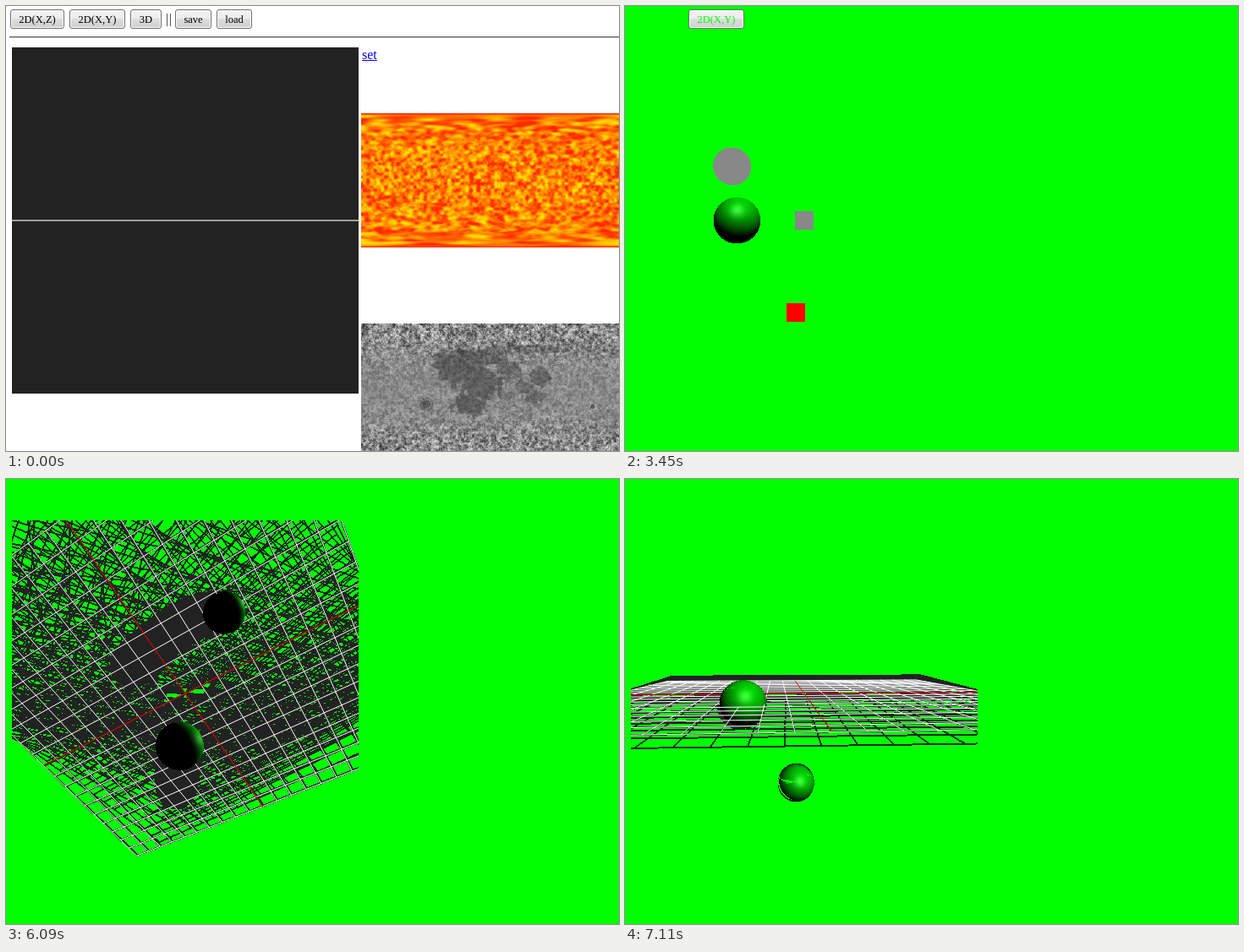
Animation, 725 px wide and 527 px high, one loop 8000 ms. Source, as an HTML page with a canvas:

```html
<!DOCTYPE html>
<html lang="en">
<head>
<meta charset="utf-8">
<title>Scene editor</title>
<style>
  html, body { margin: 0; width: 725px; height: 527px; overflow: hidden; background: #fff; }
  body { position: relative; font-family: "Liberation Serif", "Times New Roman", serif; }
  body.keyed { background: #0f0; }
  body.keyed .page { display: none; }
  body.keyed button { color: #0f0; }
  button, canvas, .page, hr, a { position: absolute; }
  button {
    top: 4px; height: 23px; box-sizing: border-box; margin: 0; padding: 1px 0 0;
    border: 1px solid #707070; border-radius: 3px; box-shadow: inset 0 0 0 1px #fbfbfb;
    font: 12.5px/19px "Liberation Serif", "Times New Roman", serif; color: #000; text-align: center;
    background: linear-gradient(#f3f3f3, #ebebeb 50%, #dddddd 50%, #cfcfcf);
  }
  .hover { border-color: #3c7fb1; background: linear-gradient(#eaf6fd, #d9f0fc 50%, #bee6fd 50%, #a7d9f5); }
  .press { border-color: #2c628b; background: linear-gradient(#e5f4fc, #c4e5f6 50%, #98d1ef 50%, #68b3db); box-shadow: none; }
  .focus { border-color: #3c7fb1; box-shadow: inset 0 0 0 1px #8fdcf8; }
  .off { display: none; }
  .bar { position: absolute; top: 9px; width: 1px; height: 15px; background: #555; }
  hr { left: 4px; top: 36px; width: 721px; height: 2px; margin: 0; border: 0; background: linear-gradient(#666 50%, #bbb 50%); }
  a { left: 421px; top: 49px; font-size: 16px; line-height: 18px; color: #00e; text-decoration: underline; }
  #view { left: 7px; top: 49px; }
  #sun { left: 420px; top: 127px; }
  #moon { left: 420px; top: 376px; }
</style>
</head>
<body>
<div class="page" style="left:0;top:0">
  <i class="bar" style="left:190px"></i><i class="bar" style="left:194px"></i>
  <hr>
  <a>set</a>
  <canvas id="sun" width="305" height="159"></canvas>
  <canvas id="moon" width="305" height="151"></canvas>
</div>
<button id="xz" style="left:5px;width:64px">2D(X,Z)</button>
<button id="xy" style="left:75px;width:66px">2D(X,Y)</button>
<button id="solid" style="left:147px;width:37px">3D</button>
<button id="save" style="left:200px;width:43px">save</button>
<button id="load" style="left:249px;width:42px">load</button>
<canvas id="view" width="410" height="410"></canvas>
<script>
const LOOP = 8000, SIZE = 410, MID = 205, FOCUS = 439.6, DIST = 20, TICK = 30;
const FLAT_LIGHT = [0.28, 0.75, 0.6], SOLID_LIGHT = [0.36, 0.62, 0.7];
const BALL_A = [-2.91, 0, 3.87], BALL_B = [-0.455, -4.96, 0];
const $ = id => document.getElementById(id);
const rgb = (r, g, b) => (0xff000000 | b << 16 | g << 8 | r) >>> 0;
const clamp = (v, lo, hi) => Math.max(lo, Math.min(hi, v));
const dot = (p, q) => p[0] * q[0] + p[1] * q[1] + p[2] * q[2];
const DARK = rgb(34, 34, 34), GRAY = rgb(136, 136, 136), RED = rgb(255, 0, 0), WHITE = rgb(255, 255, 255);

function mix(from, to, f) {
  const part = s => { const a = from >> s & 255, b = to >> s & 255; return Math.round(a + (b - a) * f); };
  return rgb(part(0), part(8), part(16));
}

// --- software renderer: orbit camera, grid plane and lit balls ---
function orbit(a, e) {
  a *= Math.PI / 180; e *= Math.PI / 180;
  const sa = Math.sin(a), ca = Math.cos(a), se = Math.sin(e), ce = Math.cos(e);
  const right = [ca, 0, -sa], up = [-sa * se, ce, -ca * se], near = [sa * ce, se, ca * ce];
  return p => [dot(right, p), dot(up, p), -dot(near, p)];
}

function drawBall(pix, depth, c, light) {
  const s = FOCUS / c[2], cx = MID + c[0] * s, cy = MID - c[1] * s, reach = s * 1.2;
  const half = [light[0], light[1], light[2] - 1];
  const len = Math.hypot(...half);
  for (let y = Math.max(0, Math.floor(cy - reach)); y < Math.min(SIZE, cy + reach); y++) {
    for (let x = Math.max(0, Math.floor(cx - reach)); x < Math.min(SIZE, cx + reach); x++) {
      const d = [(x + 0.5 - MID) / FOCUS, (MID - y - 0.5) / FOCUS, 1];
      const dd = dot(d, d), b = dot(d, c), disc = b * b - dd * (dot(c, c) - 1);
      if (disc < 0) continue;
      const t = (b - Math.sqrt(disc)) / dd, i = y * SIZE + x;
      if (1 / t < depth[i]) continue;
      const n = d.map((v, k) => v * t - c[k]);
      const lit = Math.max(0, dot(n, light));
      const shine = lit && 60 * Math.pow(Math.max(0, dot(n, half) / len), 24);
      depth[i] = 1 / t;
      pix[i] = rgb(shine, Math.min(255, 210 * lit + shine), shine);
    }
  }
}

// antialiased line, hidden where a ball is nearer
function drawLine(pix, depth, p, q, color) {
  let [s, t] = [p, q].map(v => [MID + FOCUS * v[0] / v[2], MID - FOCUS * v[1] / v[2], 1 / v[2]]);
  const steep = Math.abs(t[1] - s[1]) > Math.abs(t[0] - s[0]);
  const main = steep ? 1 : 0, side = 1 - main;
  if (s[main] > t[main]) [s, t] = [t, s];
  const end = Math.min(SIZE, Math.round(t[main]));
  for (let m = Math.max(0, Math.round(s[main])); m < end; m++) {
    const f = clamp((m + 0.5 - s[main]) / (t[main] - s[main]), 0, 1);
    const n = s[side] + (t[side] - s[side]) * f - 0.5, w = s[2] + (t[2] - s[2]) * f;
    const j = Math.floor(n);
    for (const [k, cover] of [[j, 1 - n + j], [j + 1, n - j]]) {
      if (k < 0 || k >= SIZE) continue;
      const i = steep ? m * SIZE + k : k * SIZE + m;
      if (w >= depth[i]) pix[i] = mix(pix[i], color, cover);
    }
  }
}

function render({ a = 0, e = 0, grid, balls = [], mark }) {
  const pix = new Uint32Array(SIZE * SIZE).fill(grid ? DARK : GRAY);
  const depth = new Float32Array(SIZE * SIZE);
  const turn = orbit(a, e);
  const place = p => { const v = turn(p); v[2] += DIST; return v; };
  if (grid && e === 0) pix.fill(rgb(158, 160, 158), 204 * SIZE, 206 * SIZE);
  balls.forEach(b => drawBall(pix, depth, place(b), turn(grid ? SOLID_LIGHT : FLAT_LIGHT)));
  if (grid && e !== 0) {
    const pair = (k, color) => {
      drawLine(pix, depth, place([k, 0, -10]), place([k, 0, 10]), color);
      drawLine(pix, depth, place([-10, 0, k]), place([10, 0, k]), color);
    };
    for (let k = -10; k <= 10; k++) if (k) pair(k, WHITE);
    pair(0, RED);
  }
  if (mark) for (let y = 0; y < 22; y++) {
    const row = (mark[1] + y) * SIZE + mark[0];
    pix.fill(RED, row, row + 22);
  }
  return pix;
}

// --- camera drag: time, azimuth, elevation ---
const DRAG = [
  [5790, 0, 0], [5820, -10, -17], [6060, -59, -59.1], [6090, -59.4, -59.4], [6210, -42, -72],
  [6330, -14, -74], [6420, -1, -54], [6570, 20, -3], [6600, 24, 3], [6720, 30, 14],
  [6840, 30, 14], [7080, -2.7, 8.2], [7110, -4.3, 6]
];
function dragAt(t) {
  const k = Math.max(1, DRAG.findIndex(d => d[0] >= t));
  const [p, q] = [DRAG[k - 1], DRAG[k]], f = (t - p[0]) / (q[0] - p[0]);
  return { a: p[1] + (q[1] - p[1]) * f, e: p[2] + (q[2] - p[2]) * f };
}

// --- canvas states; each paints only the pixels that changed, "wipe" empties first ---
const both = [BALL_A, BALL_B], top2d = { a: 90, e: 90 };
const shots = [
  { t: 0, grid: true },
  { t: 840 },
  { t: 1140, mark: [109, 130] },
  { t: 2100, ...top2d, balls: [BALL_A], wipe: true },
  { t: 3030, balls: [BALL_A] },
  { t: 3060, balls: [BALL_A], mark: [194, 194] },
  { t: 3450, balls: [BALL_A], mark: [184, 303] },
  { t: 4320, balls: both, wipe: true },
  { t: 5520, balls: both, grid: true }
];
for (const [from, to] of [[5820, 6720], [6870, 7110]]) {
  for (let t = from; t <= to; t += TICK) {
    shots.push({ t, ...dragAt(t), balls: both, grid: true, wipe: [5850, 6600, 7110].includes(t) });
  }
}
let last = new Uint32Array(SIZE * SIZE), seen = new Uint32Array(SIZE * SIZE);
for (const shot of shots) {
  const now = render(shot);
  seen = shot.wipe ? new Uint32Array(SIZE * SIZE) : seen.slice();
  for (let i = 0; i < now.length; i++) if (now[i] !== last[i]) seen[i] = now[i];
  shot.image = new ImageData(new Uint8ClampedArray(seen.buffer), SIZE, SIZE);
  last = now;
}

// --- textures ---
function hash(x, y, z) {
  let h = Math.imul(x, 374761393) ^ Math.imul(y, 668265263) ^ Math.imul(z, 1274126177);
  h = Math.imul(h ^ h >>> 13, 1103515245);
  return ((h ^ h >>> 16) >>> 0) / 4294967296;
}
function noise(p, freq) {
  const q = p.map(v => v * freq + 100), c = q.map(Math.floor);
  const f = q.map((v, i) => { const u = v - c[i]; return u * u * (3 - 2 * u); });
  let sum = 0;
  for (let k = 0; k < 8; k++) {
    const b = [k & 1, k >> 1 & 1, k >> 2];
    const w = b.reduce((m, on, i) => m * (on ? f[i] : 1 - f[i]), 1);
    sum += w * hash(c[0] + b[0], c[1] + b[1], c[2] + b[2]);
  }
  return sum;
}
// shade(point on the sphere, x, y) for an equirectangular map
function paint(id, shade) {
  const cv = $(id), ctx = cv.getContext("2d"), img = ctx.createImageData(cv.width, cv.height);
  const out = new Uint32Array(img.data.buffer);
  for (let y = 0; y < cv.height; y++) for (let x = 0; x < cv.width; x++) {
    const lat = (y + 0.5) / 159 * Math.PI, lon = x / 318 * 2 * Math.PI, s = Math.sin(lat);
    out[y * cv.width + x] = shade([s * Math.cos(lon), Math.cos(lat), s * Math.sin(lon)], x, y);
  }
  ctx.putImageData(img, 0, 0);
}
paint("sun", p => {
  const v = 0.75 * noise(p, 13) + 0.25 * noise(p, 27);
  return rgb(255, clamp(124 + (v - 0.5) * 300, 40, 225), 0);
});

// dark plains: x, y, radii, strength
const PLAINS = [
  [118, 50, 30, 24, 1], [140, 72, 26, 18, 1], [127, 95, 20, 15, 1], [146, 40, 22, 10, 0.9],
  [174, 54, 16, 14, 0.7], [192, 74, 10, 8, 0.7], [211, 63, 11, 11, 0.8], [206, 87, 11, 8, 0.7],
  [190, 30, 52, 5, 0.6], [77, 95, 5, 5, 1], [273, 98, 3, 3, 1.2], [172, 85, 9, 6, 0.5]
];
paint("moon", (p, x, y) => {
  const wobble = (noise(p, 11) - 0.5) * 0.8, polar = Math.pow(Math.abs(p[1]), 3);
  let dark = 0;
  for (const [cx, cy, rx, ry, k] of PLAINS) {
    const d = Math.hypot((x - cx) / rx, (y - cy) / ry) + wobble;
    dark = Math.max(dark, k * clamp((1.1 - d) / 0.25, 0, 1));
  }
  const ring = Math.abs(Math.hypot(x - 77, y - 95) - 7) < 1.2 ? 28 : 0;
  const spot = [x, y, 0];
  const grain = 0.5 * noise(spot, 0.31) + 0.5 * noise(spot, 0.77) - 0.5;
  const v = 138 + grain * (85 + 150 * polar) * (1 - 0.4 * dark) - 44 * dark - ring;
  const g = clamp(v, 25, 235);
  return rgb(g, g, g);
});

// --- buttons: time, id, look ---
const BUTTONS = ["xz", "xy", "solid", "save", "load"];
const LOOKS = [
  [630, "xz", "hover"], [810, "xz", "press"], [960, "xz", "focus"],
  [2100, "", "off"], [2760, "xy", "hover"], [3030, "xy", "press"], [3060, "xy", ""],
  [4320, "", "off"], [4890, "load", "hover"], [4920, "load", ""], [4950, "solid", "focus"],
  [5130, "solid", "hover"], [5490, "solid", "press"], [5850, "", "off"]
];

const ctx = $("view").getContext("2d");
const start = performance.now();
let shown;
function frame() {
  const t = Math.max(0, performance.now() - start) % LOOP;
  const shot = shots.filter(s => s.t <= t).pop();
  if (shot !== shown) ctx.putImageData((shown = shot).image, 0, 0);
  document.body.classList.toggle("keyed", t >= 2100);
  const look = {};
  for (const [at, id, cls] of LOOKS) {
    if (at <= t) (id ? [id] : BUTTONS).forEach(b => look[b] = cls);
  }
  BUTTONS.forEach(b => $(b).className = look[b] || "");
  requestAnimationFrame(frame);
}
frame();
</script>
</body>
</html>
```
